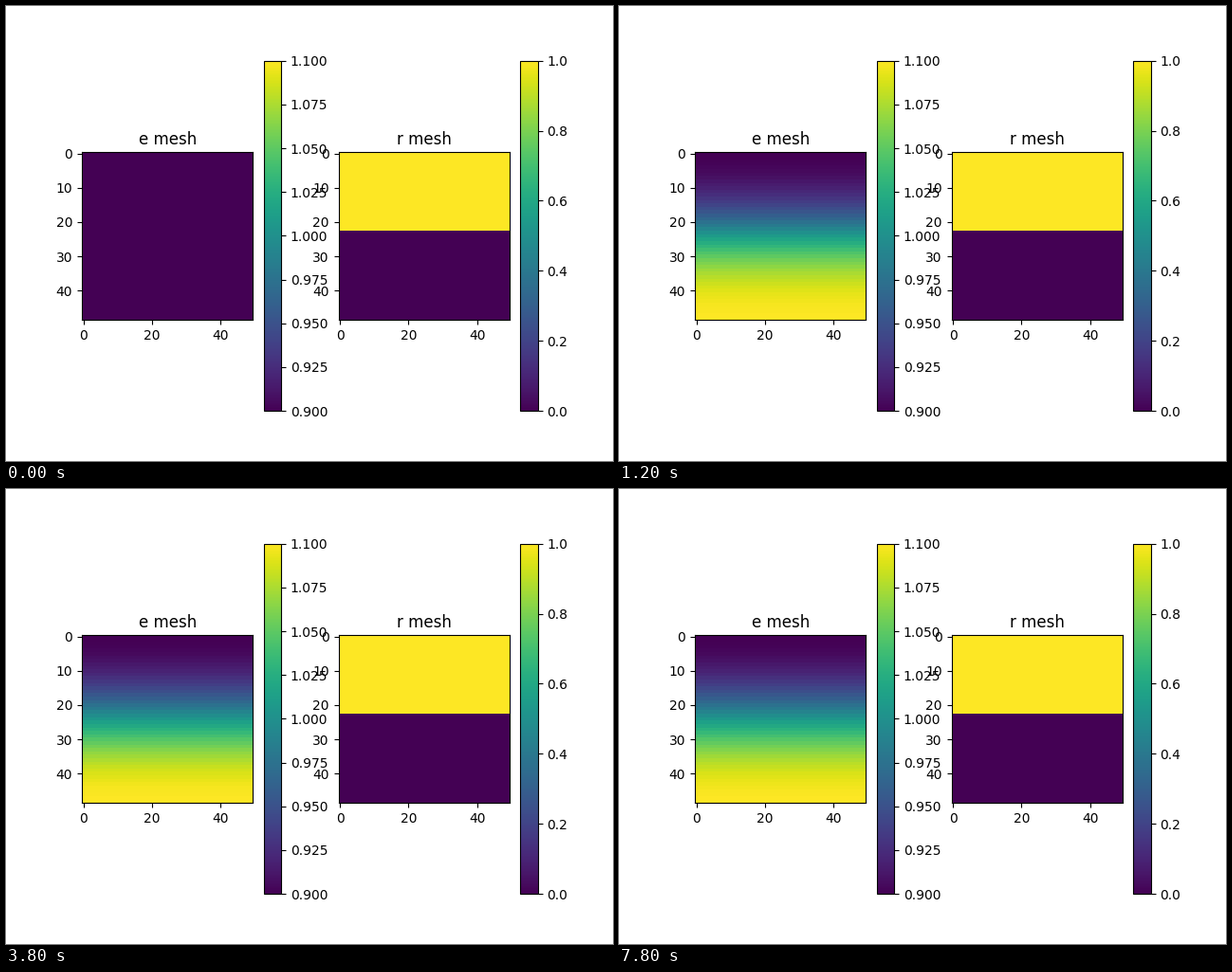
Animation, 640 px wide and 480 px high, one loop 8000 ms. Source, as a matplotlib script:

```python
import numpy as np
import matplotlib.pyplot as plt
from matplotlib.animation import FuncAnimation

ROWS, COLS, SPLIT = 49, 50, 23
FRAMES, INTERVAL = 40, 200
DIFFUSION = 45  # cells squared per step

# Cosine modes of a steady step source between insulated walls
depth = np.arange(ROWS) + 0.5
modes = np.arange(1, 80)
waves = np.cos(np.pi * np.outer(depth, modes) / ROWS)
source = -np.sin(np.pi * modes * SPLIT / ROWS) / modes
decay = DIFFUSION * (np.pi * modes / ROWS) ** 2


def e_mesh(step):
    """Diffusing field, rescaled to fill the colour range."""
    if step == 0:
        return np.full((ROWS, COLS), 0.9)
    column = waves @ (source * (1 - np.exp(-decay * step)) / decay)
    column = (column - column.min()) / np.ptp(column)
    return np.repeat(0.9 + 0.2 * column[:, None], COLS, axis=1)


def r_mesh():
    mesh = np.zeros((ROWS, COLS))
    mesh[:SPLIT] = 1
    return mesh


def show_mesh(ax, mesh, title, low, high):
    image = ax.imshow(mesh, cmap="viridis", vmin=low, vmax=high)
    ax.set_title(title)
    fig.colorbar(image, ax=ax)
    return image


fig, (left, right) = plt.subplots(1, 2, figsize=(6.4, 4.8), dpi=100)
e_image = show_mesh(left, e_mesh(0), "e mesh", 0.9, 1.1)
show_mesh(right, r_mesh(), "r mesh", 0, 1)


def update(step):
    e_image.set_data(e_mesh(step))
    return [e_image]


anim = FuncAnimation(fig, update, frames=FRAMES, init_func=lambda: update(0),
                     interval=INTERVAL, repeat=True, repeat_delay=0)
plt.show()
```
